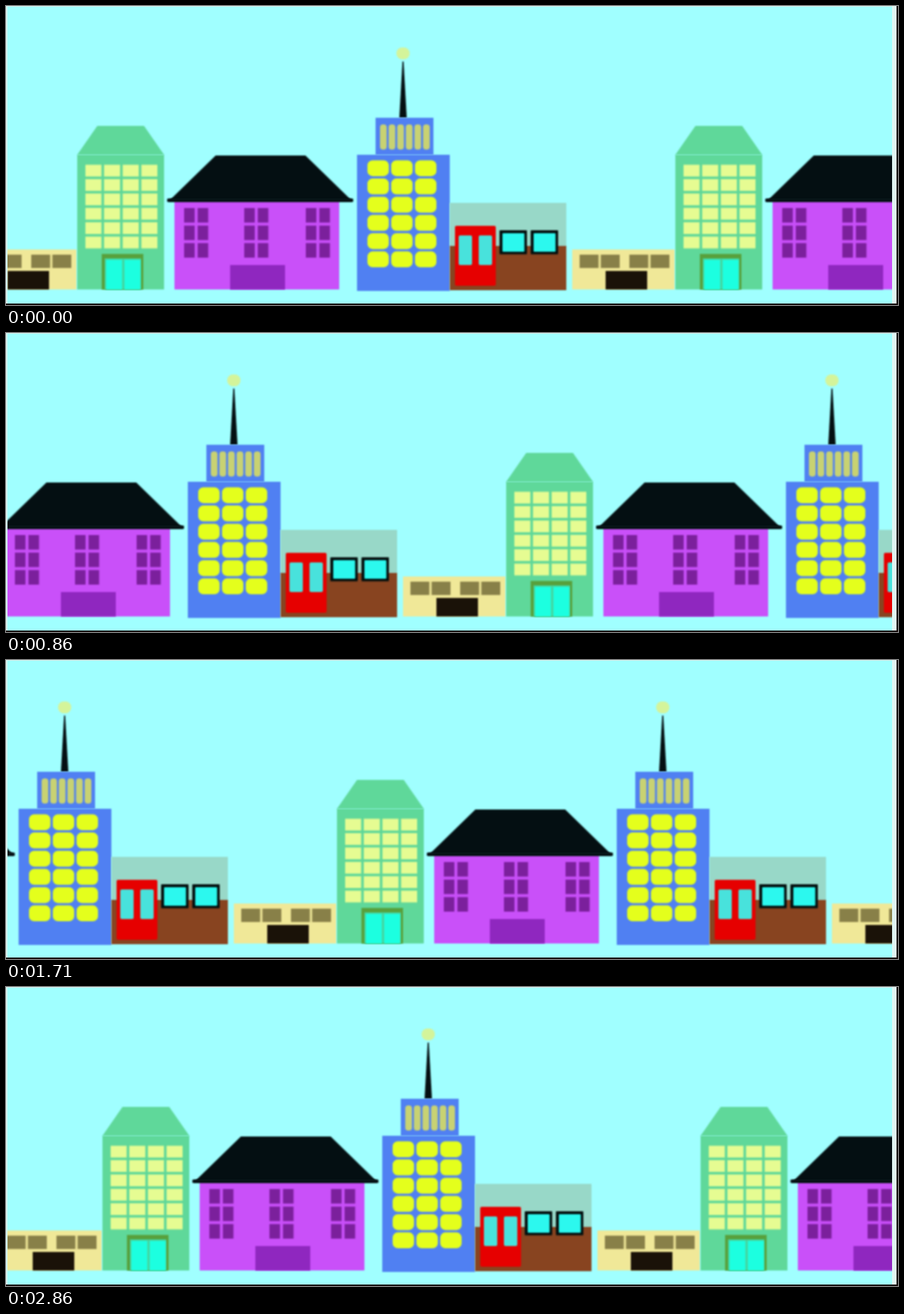
Recreate the animation shown at these times as an HTML page with a canvas. Size 1202 by 404 pixels, loop 3010 ms.

```html
<!DOCTYPE html>
<html lang="en">
<head>
<meta charset="utf-8">
<title>Scrolling street</title>
<style>
  html, body { margin: 0; width: 100%; height: 100%; overflow: hidden; background: #a0ffff; }
  canvas { display: block; }
</style>
</head>
<body>
<canvas id="stage" width="1202" height="404"></canvas>
<script>
const stage = document.getElementById('stage');
const { width: W, height: H } = stage;
const view = stage.getContext('2d');
const STREET = 806, LOOP = 3010, STEPS_PER_MS = 0.007, LAST_STEP = 20;
// Pace of the scroll: [step, distance]
const PACE = [[0, 0], [12, 456], [15, 576], [18, 691], [LAST_STEP, 772]];

// The street is painted once, softly, and then only shifted
const street = new OffscreenCanvas(STREET * 3, H);
const pen = street.getContext('2d');

function box(color, x, y, w, h, radius = 0) {
  pen.fillStyle = color;
  pen.beginPath();
  pen.roundRect(x, y, w, h, radius);
  pen.fill();
}

// Symmetric shape: a top edge widening to a bottom edge
function taper(color, middle, top, bottom, topWidth, bottomWidth) {
  pen.fillStyle = color;
  pen.beginPath();
  pen.moveTo(middle - topWidth / 2, top);
  pen.lineTo(middle + topWidth / 2, top);
  pen.lineTo(middle + bottomWidth / 2, bottom);
  pen.lineTo(middle - bottomWidth / 2, bottom);
  pen.fill();
}

// Panes that fill an area, with equal gaps between them
function panes(color, x, y, w, h, cols, rows, gap, radius = 0) {
  const pw = (w + gap) / cols, ph = (h + gap) / rows;
  for (let c = 0; c < cols; c++)
    for (let r = 0; r < rows; r++)
      box(color, x + c * pw, y + r * ph, pw - gap, ph - gap, radius);
}

function creamShop(x) {
  box('#f0e898', x, 329, 138, 54);
  for (const side of [10, 77]) panes('#888048', x + side, 336, 54, 18, 2, 1, 3);
  box('#1a1208', x + 45, 358, 56, 25);
}

function greenBlock(x) {
  taper('#5fd89a', x + 58.5, 162, 201, 63, 117);
  box('#5fd89a', x, 201, 117, 182);
  panes('#e6fc92', x + 11, 214.5, 97, 113, 4, 6, 3.5);
  box('#58a03c', x + 33, 335, 56, 48);
  box('#48d49c', x + 37, 341, 49, 42);
  panes('#1cffe0', x + 39, 343, 46, 40, 2, 1, 3);
}

function purpleHouse(x) {
  box('#c950f9', x, 263, 222, 120);
  taper('#040f12', x + 116, 202, 262, 121, 244);
  box('#040f12', x - 10, 260, 251, 5, 2);
  for (const window of [13, 94, 177]) panes('#7b209c', x + window, 273, 32.5, 67, 2, 3, 4);
  box('#8f27bf', x + 75, 350, 74, 33);
}

function tower(x) {
  taper('#040f12', x + 62, 75, 151, 1.5, 10);
  box('#d4f49a', x + 53, 56, 18, 16, 8);
  box('#5080f2', x + 25, 151, 78, 50);
  box('#5080f2', x, 201, 125, 184);
  panes('#c8d272', x + 31, 160, 67, 34, 6, 1, 2.6, 4);
  panes('#e4ff1c', x + 14, 208.5, 93, 144.5, 3, 6, 3.2, 7);
}

function diner(x) {
  box('#98d8c8', x, 266, 157, 58);
  box('#884420', x, 324, 157, 60);
  box('#e60000', x + 7, 297, 55, 81, 2);
  panes('#48e2dc', x + 12, 310, 45, 40, 2, 1, 9, 2);
  panes('#04100f', x + 67, 303, 79, 32.5, 2, 1, 5, 1);
  panes('#2cf8ee', x + 71, 307, 71.5, 25, 2, 1, 12.5, 1);
}

function paintStreet() {
  pen.fillStyle = '#a0ffff';
  pen.fillRect(0, 0, street.width, H);
  pen.filter = 'blur(0.9px)';
  for (let x = -43; x < street.width; x += STREET) {
    creamShop(x);
    greenBlock(x + 139);
    purpleHouse(x + 270);
    tower(x + 516);
    diner(x + 641);
  }
}

function scrolled(step) {
  const k = Math.max(1, PACE.findIndex(([end]) => end >= step));
  const [[s0, x0], [s1, x1]] = [PACE[k - 1], PACE[k]];
  return Math.round(x0 + (x1 - x0) * (step - s0) / (s1 - s0));
}

function edge(color, x, y, w, h) {
  view.fillStyle = color;
  view.fillRect(x, y, w, h);
}

function draw(time) {
  // Steps change on a clock of 10 ms ticks
  const tick = Math.floor(time % LOOP / 10) * 10 + 5;
  const step = Math.min(LAST_STEP, Math.floor(tick * STEPS_PER_MS));

  view.drawImage(street, -scrolled(step), 0);
  edge('#d4eeea', 0, 0, W, 1);
  edge('#d4f4f0', 0, 0, 2, H);
  edge('#e0f6f3', 1194, 0, 6, H);
  edge('#180c0c', W - 2, 0, 2, H);
  edge('#180c0c', 0, H - 2, W, 2);
}

paintStreet();
const start = performance.now();
function frame() {
  draw(performance.now() - start);
  requestAnimationFrame(frame);
}
frame();
</script>
</body>
</html>
```
